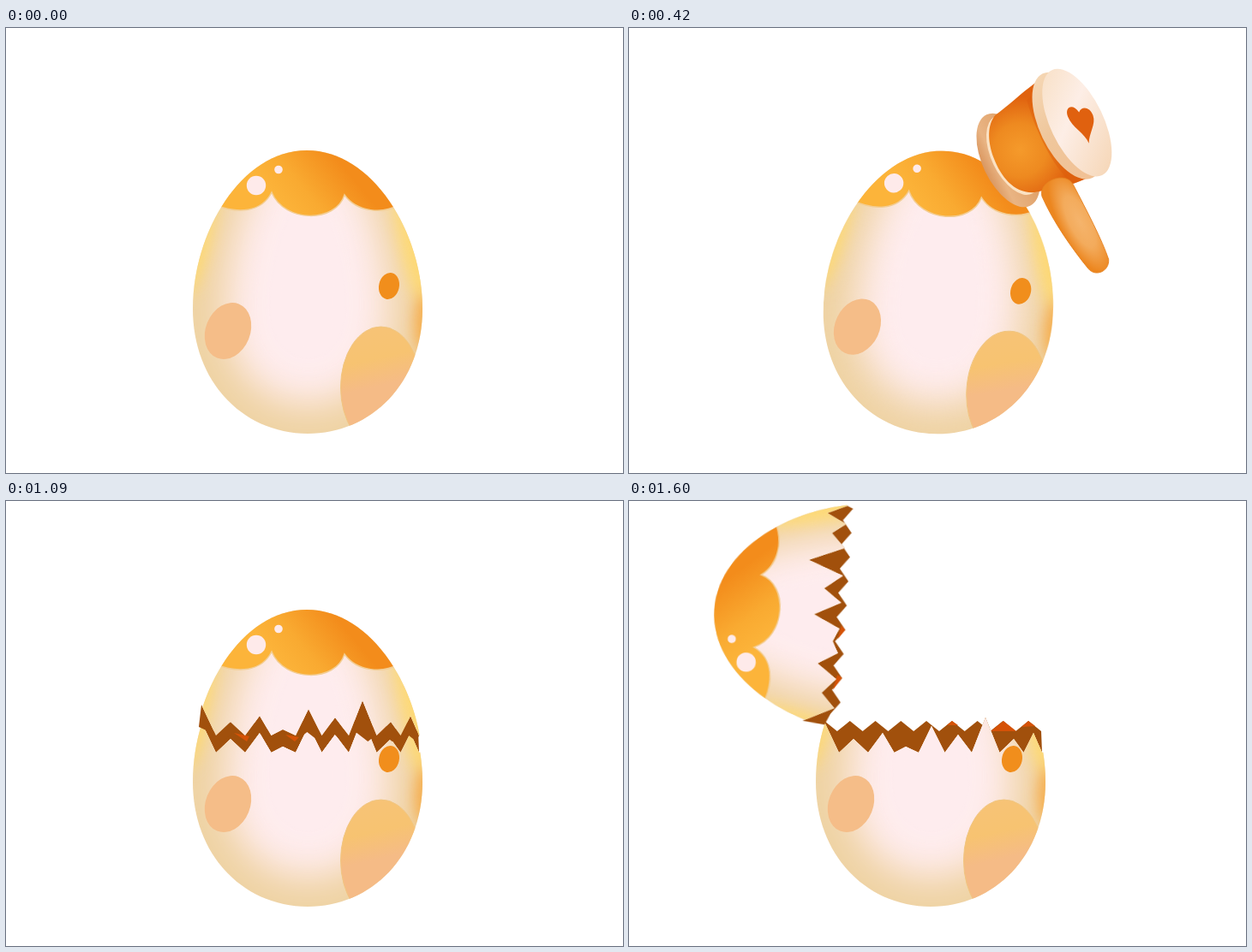
An HTML page for the animation above (1.67 s loop, 720 px wide and 520 px high).

```html
<!DOCTYPE html>
<html lang="en">
<head>
<meta charset="utf-8">
<title>Egg and mallet</title>
<style>
html, body { margin: 0; width: 100%; height: 100%; overflow: hidden; background: #fff; }
svg { display: block; width: 100%; height: 100%; }
</style>
</head>
<body>
<svg viewBox="0 0 720 520">
<defs>
  <clipPath id="eggClip"><path d="M351 143C427 143 486 238 486 328C486 415 426 474 352 474C278 474 218 415 218 328C218 238 275 143 351 143Z"/></clipPath>
  <clipPath id="topClip"><polygon id="topCut"/></clipPath>
  <clipPath id="baseClip"><polygon id="baseCut"/></clipPath>
  <filter id="soft" filterUnits="userSpaceOnUse" x="100" y="50" width="520" height="500"><feGaussianBlur stdDeviation="22"/></filter>
  <filter id="haze" filterUnits="userSpaceOnUse" x="100" y="50" width="520" height="500"><feGaussianBlur stdDeviation="9"/></filter>

  <linearGradient id="icing" gradientUnits="userSpaceOnUse" x1="325" y1="215" x2="392" y2="160">
    <stop offset="0" stop-color="#fcb43a"/><stop offset=".4" stop-color="#f9aa31"/><stop offset="1" stop-color="#f38c1b"/>
  </linearGradient>
  <linearGradient id="patch" gradientUnits="userSpaceOnUse" x1="425" y1="350" x2="445" y2="440">
    <stop offset="0" stop-color="#f7c376"/><stop offset=".4" stop-color="#f7c371"/><stop offset=".75" stop-color="#f5bb86"/>
  </linearGradient>
  <radialGradient id="barrel" gradientUnits="userSpaceOnUse" cx="512" cy="112" r="62">
    <stop offset="0" stop-color="#f59a2b"/><stop offset=".5" stop-color="#ee8a20"/><stop offset="1" stop-color="#e0620f"/>
  </radialGradient>
  <linearGradient id="backRim">
    <stop offset="0" stop-color="#d9965f"/><stop offset=".25" stop-color="#e9b483"/><stop offset="1" stop-color="#dc9a60"/>
  </linearGradient>
  <linearGradient id="frontRim" x1="0" y1="0" x2=".2" y2="1">
    <stop offset="0" stop-color="#f6d9b8"/><stop offset=".5" stop-color="#efc79c"/><stop offset="1" stop-color="#f1c195"/>
  </linearGradient>
  <linearGradient id="face" x1=".2" y1="0" x2=".6" y2="1">
    <stop offset="0" stop-color="#f8e0c6"/><stop offset=".45" stop-color="#fdeee6"/><stop offset="1" stop-color="#f6d8ba"/>
  </linearGradient>
  <radialGradient id="grip" gradientUnits="userSpaceOnUse" cx="0" cy="0" r="1" gradientTransform="translate(548 215) rotate(-7) scale(24 66)">
    <stop offset="0" stop-color="#f5b46c"/><stop offset=".5" stop-color="#f3ab5c"/><stop offset="1" stop-color="#ec861f"/>
  </radialGradient>

  <g id="shell" clip-path="url(#eggClip)">
    <rect x="190" y="120" width="320" height="380" fill="#efd3a3"/>
    <g filter="url(#haze)">
      <ellipse cx="226" cy="252" rx="13" ry="64" fill="#fdd871" transform="rotate(14 226 252)"/>
      <ellipse cx="475" cy="255" rx="17" ry="76" fill="#fdd871" transform="rotate(-13 475 255)"/>
      <ellipse cx="489" cy="345" rx="12" ry="36" fill="#f6a83f"/>
    </g>
    <path d="M352 120C400 120 447 240 447 330C447 400 402 440 352 440C302 440 257 400 257 330C257 240 304 120 352 120Z" fill="#feecee" filter="url(#soft)"/>
    <path d="M356 190C392 210 403 300 396 352C388 400 318 400 309 352C299 290 322 200 356 190Z" fill="#feecee" filter="url(#haze)"/>
    <path d="M200 100H500V207H458C440 217 410 216 395 195C385 228 325 228 310 192C298 216 270 217 245 207H200Z" fill="url(#icing)" stroke="#f3cd92" stroke-width="1.5"/>
    <circle cx="292" cy="184" r="11.2" fill="#feeaea"/>
    <circle cx="318" cy="165.5" r="4.8" fill="#feeaea"/>
    <ellipse cx="259" cy="354" rx="26" ry="34" fill="#f5bd88" transform="rotate(22 259 354)"/>
    <ellipse cx="447" cy="301.5" rx="11.8" ry="15.6" fill="#f18e1c" transform="rotate(13 447 301.5)"/>
    <ellipse cx="437.5" cy="420" rx="47" ry="71" fill="url(#patch)" stroke="#f0c580"/>
  </g>
</defs>

<g id="whole"><use href="#shell"/></g>

<g id="broken">
  <polygon id="baseInner" fill="#a1500c"/>
  <path d="M422 269L437 257L452 269ZM371 262L377 257L384 262ZM458 264L466 257L474 263Z" fill="#d55207"/>
  <g clip-path="url(#baseClip)"><use href="#shell"/></g>
  <g id="top">
    <polygon id="topInner" fill="#a1500c"/>
    <path d="M266 271L281 281L284 275ZM326 273L337 281L342 276Z" fill="#d55207"/>
    <g clip-path="url(#topClip)"><use href="#shell" y="-16"/></g>
  </g>
</g>

<g id="mallet">
  <ellipse cx="495" cy="118.5" rx="30" ry="59" fill="url(#backRim)" transform="rotate(-5 495 118.5)"/>
  <ellipse cx="503" cy="115" rx="26" ry="50" fill="#fbe2c3" transform="rotate(-5 503 115)"/>
  <path d="M499 64C517 59 535 51 556 45L578 170C555 173 530 168 509 164C488 157 480 134 480 110C480 88 487 71 499 64Z" fill="url(#barrel)"/>
  <path d="M540 60C536 110 544 150 556 171L580 170L570 50Z" fill="#de5f0d" opacity=".5"/>
  <path d="M517 172C519 153 554 153 556 172C560 205 565 245 564 268C560 282 542 282 538 270C528 240 519 205 517 172Z" fill="url(#grip)" stroke="#e5811f" stroke-width=".8"/>
  <ellipse cx="574" cy="105" rx="32.5" ry="67.5" fill="url(#frontRim)" transform="rotate(-5 574 105)"/>
  <ellipse cx="585.5" cy="105.5" rx="31" ry="68" fill="url(#face)" transform="rotate(-5 585.5 105.5)"/>
  <path d="M590 133C590 120 578 109 578 95C578 83 589 82 592 95C597 89 606 93 606 104C606 115 594 122 590 133Z" fill="#e0610f"/>
</g>
</svg>
<script>
const LOOP = 1670;
const el = id => document.getElementById(id);

// Sawtooth of n strokes from x0 to x1 between heights y0 and y1
const zigzag = (x0, x1, n, y0, y1) =>
  Array.from({ length: n + 1 }, (_, i) => [x0 + (x1 - x0) * i / n, i % 2 ? y1 : y0]);

// Teeth of the crack, with a notch halfway to the next tooth
const teeth = [[228, 258], [262, 278], [296, 271], [323, 287], [353, 263], [384, 273], [416, 253], [449, 278], [472, 271]];
const baseFront = teeth.flatMap((p, i) => [p, [(p[0] + (teeth[i + 1] || [492])[0]) / 2, 294]]);
const topFront = baseFront.map(([x, y]) => [x, y - 20]);
const baseBack = zigzag(228, 481, 17, 257, 269);
const topBack = [[225, 264], ...zigzag(238, 479, 17, 270, 281)];

const setPoints = (id, ...lists) => el(id).setAttribute("points", lists.flat().join(" "));
const back = list => [...list].reverse();
setPoints("baseCut", baseFront, [[500, 285], [500, 500], [200, 500], [200, 258]]);
setPoints("topCut", topFront, [[500, 265], [500, 100], [200, 100], [200, 238]]);
setPoints("baseInner", baseBack, back(baseFront));
setPoints("topInner", topBack, back(topFront));

const ease = u => { u = Math.min(1, Math.max(0, u)); return u * u * (3 - 2 * u); };
const ramp = (t, from, to) => ease((t - from) / (to - from));

const show = (id, on) => el(id).setAttribute("display", on ? "inline" : "none");
const move = (id, x, y, a, px, py) =>
  el(id).setAttribute("transform", `translate(${x} ${y}) rotate(${a} ${px} ${py})`);

function draw(ms) {
  const step = ms < 1000 ? Math.floor(ms / 30) * 30 : 10 + Math.floor((ms - 10) / 30) * 30;
  const t = Math.min(step, 1600);
  const cracked = t >= 1000;
  show("whole", !cracked);
  show("broken", cracked);
  show("mallet", t >= 30 && t < 720);

  // Knocked left, rocks right, settles
  const rock = -7.7 * ramp(t, 70, 215) + 12 * ramp(t, 215, 465) - 4.3 * ramp(t, 465, 955);
  move("whole", 0, 0, rock, 348.5, 482);

  // Quick blow, slow return that sags on the way
  const hit = ramp(t, 30, 200) - ramp(t, 200, 670), sag = hit * (1 - hit);
  move("mallet", 4 * hit + 2 * sag, 28 * sag - 3.5 * hit, -37.5 * hit, 553, 286);

  const lift = 16 * ramp(t, 970, 1090), open = ramp(t, 1100, 1600);
  move("top", 13.6 * open, 16 - lift - 40.5 * open, -86.3 * open, 240, 288.5);
}

function tick() {
  draw(performance.now() % LOOP);
  requestAnimationFrame(tick);
}
tick();
</script>
</body>
</html>
```
